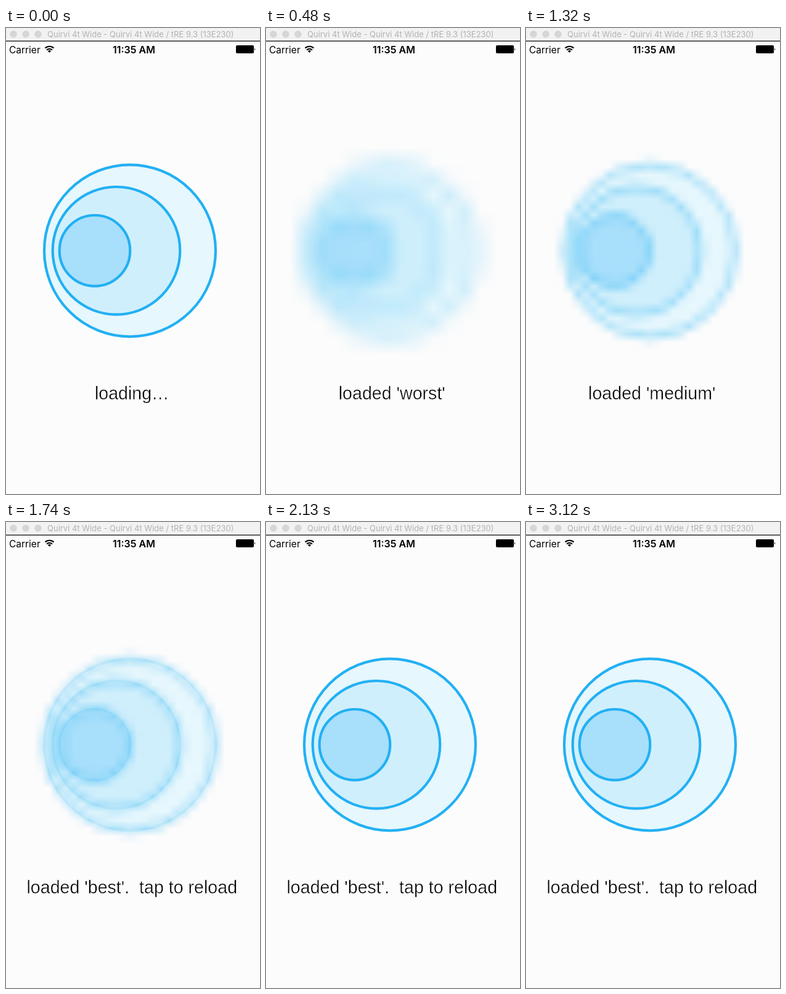
These frames come from a looping animation (412x754 px, 3.15 s). An HTML page with a canvas:

```html
<!DOCTYPE html>
<html lang="en">
<head>
<meta charset="utf-8">
<title>Progressive image loading</title>
<style>
  html, body { margin: 0; width: 100%; height: 100%; overflow: hidden; background: #fcfcfc; }
  canvas, svg { position: absolute; left: 0; top: 0; }
  text { font-family: Inter, Roboto, sans-serif; white-space: pre; }
  /* A thin background-coloured outline slims the label to a light weight. */
  #label { font: 28.6px "Liberation Sans", Arial, sans-serif; stroke: #fcfcfc; stroke-width: .5; }
</style>
</head>
<body>
<canvas id="stage" width="412" height="754"></canvas>
<svg width="412" height="754">
  <rect width="412" height="20.5" fill="#f2f2f2"/>
  <rect y="20.5" width="412" height="1.3" fill="#111"/>
  <g fill="#d6d6d6">
    <circle cx="12" cy="10" r="5.8"/>
    <circle cx="32" cy="10" r="5.8"/>
    <circle cx="52" cy="10" r="5.8"/>
  </g>
  <text x="67" y="15" font-size="13" fill="#b2b2b2">Quirvi 4t Wide - Quirvi 4t Wide / tRE 9.3 (13E230)</text>
  <text x="5" y="41" font-size="15.5">Carrier</text>
  <g fill="none" stroke="#000" stroke-width="2">
    <path d="M63.5 32.5a10 10 0 0 1 14 0M66 35.6a6.4 6.4 0 0 1 9 0"/>
    <path d="M70.5 40l-2.6-2.8a3.8 3.8 0 0 1 5.2 0z" fill="#000" stroke="none"/>
  </g>
  <text x="207.5" y="41" font-size="16" font-weight="600" text-anchor="middle">11:35 AM</text>
  <rect x="373" y="28" width="29" height="13" rx="2"/>
  <path d="M403 32.5q2 2 0 4z"/>
  <text id="label" x="204.3" y="600.5" text-anchor="middle">loading…</text>
</svg>
<script>
const LOOP = 3150, FADE = 250, SIZE = 412, TOP = 154, BG = '#fcfcfc';
const ctx = document.getElementById('stage').getContext('2d');
const label = document.getElementById('label');

// Renders the nested rings into a square image of the given resolution.
function rings(pixels) {
  const image = document.createElement('canvas');
  image.width = image.height = pixels;
  const c = image.getContext('2d');
  c.scale(pixels / SIZE, pixels / SIZE);
  c.fillStyle = BG;
  c.fillRect(0, 0, SIZE, SIZE);
  c.strokeStyle = '#22b0f3';
  c.lineWidth = 4.2;
  for (const [x, r, fill] of [[201, 139, '#e6f7fd'], [179, 103.3, '#d0effc'], [144, 57.3, '#a8dffb']]) {
    c.beginPath();
    c.arc(x, 360.3 - TOP, r, 0, 2 * Math.PI);
    c.fillStyle = fill;
    c.fill();
    c.stroke();
  }
  return image;
}

const worst = rings(16), medium = rings(32), best = rings(SIZE);

const stages = [
  { at: 0, image: best, text: 'loading…' },
  { at: 180, image: worst, text: "loaded 'worst'" },
  { at: 1020, image: medium, text: "loaded 'medium'" },
  { at: 1720, image: best, text: "loaded 'best'.\u00a0 tap to reload" }
];

function paint(image, alpha) {
  ctx.globalAlpha = alpha;
  ctx.drawImage(image, 0, TOP, SIZE, SIZE);
}

const start = performance.now();

function frame() {
  const t = (performance.now() - start) % LOOP;
  const i = stages.findLastIndex(s => t >= s.at);
  const { at, image, text } = stages[i];
  if (i) paint(stages[i - 1].image, 1);
  paint(image, i ? Math.min(1, (t - at) / FADE) : 1);
  if (label.textContent !== text) label.textContent = text;
  requestAnimationFrame(frame);
}

frame();
</script>
</body>
</html>
```
